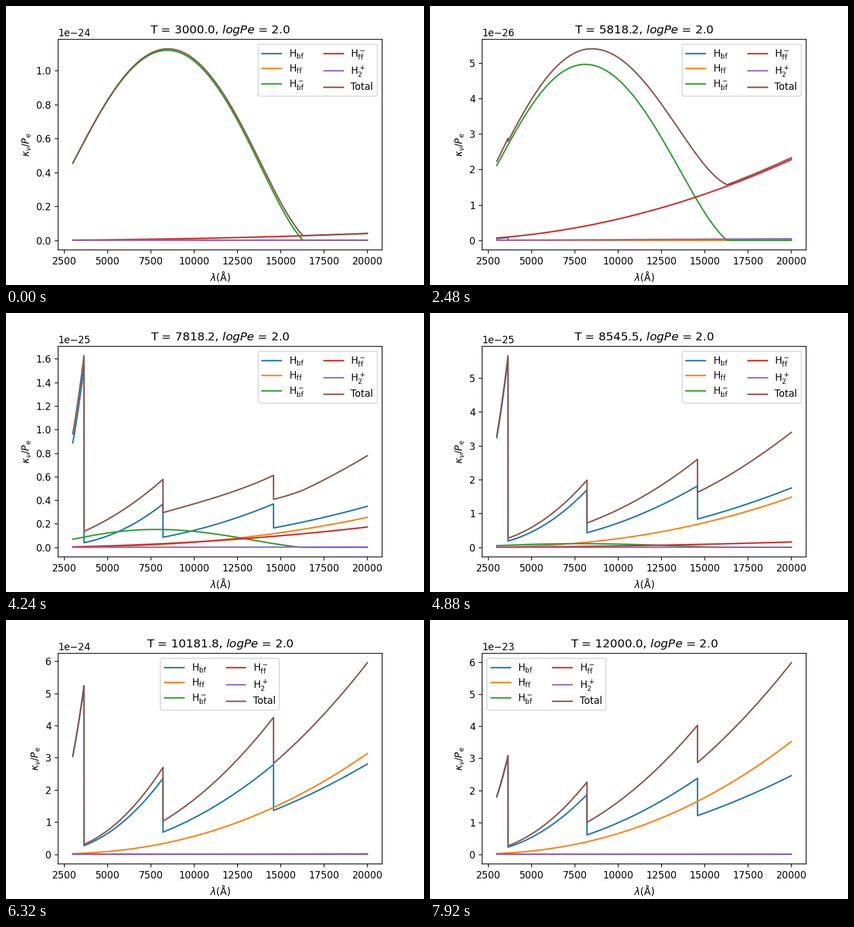
A matplotlib script that plays this animation: 734x489 px, repeating every 8000 ms.

```python
import numpy as np
import matplotlib.pyplot as plt
from matplotlib.animation import FuncAnimation

WIDTH, HEIGHT, DPI = 734, 489, 122.25
FRAMES, INTERVAL = 100, 80

RYDBERG = 1.0968e-3    # 1/angstrom
ION = 13.6             # hydrogen ionisation energy, eV
ALPHA = 1.0449e-26
LOG_E = np.log10(np.e)
PE = 100.0

lam = np.arange(3000.0, 20001.0, 2.0)
log_lam = np.log10(lam)
photon = 1.2398e4 / lam
x = lam * RYDBERG
gaunt = 0.3456 / np.cbrt(x)

# Bound levels: each absorbs only below its own ionisation edge.
level = np.arange(1.0, 121.0)
chi = ION * (1 - 1 / level**2)
ratio = x[:, None] / level**2
bf_weight = np.where(ratio < 1, 1 - gaunt[:, None] * (ratio - 0.5), 0) / level**3


def poly(coeffs, value):
    return np.polynomial.polynomial.polyval(value, coeffs)


cross_section = poly([1.99654, -1.18267e-5, 2.64243e-6, -4.40524e-10,
                      3.23992e-14, -1.39568e-18, 2.78701e-23], lam)
cross_section = np.where(lam < 16300, np.maximum(cross_section, 0), 0) * 1e-18

F0 = poly([-2.2763, -1.6850, 0.76661, -0.053346], log_lam)
F1 = poly([15.2827, -9.2846, 1.99381, -0.142631], log_lam)
F2 = poly([-197.789, 190.266, -67.9775, 10.6913, -0.625151], log_lam)


def opacities(temp):
    """Absorption per electron pressure for each source, then the total."""
    theta = 5040 / temp
    log_theta = np.log10(theta)
    stim = 1 - 10 ** (-photon * theta)
    scale = ALPHA * lam**3 * stim / PE

    h_bf = scale * (bf_weight @ 10 ** (-theta * chi))
    g_ff = 1 + gaunt * (LOG_E / (theta * photon) + 0.5)
    h_ff = scale * g_ff * LOG_E / (2 * theta * ION) * 10 ** (-theta * ION)
    neg_bf = 4.158e-10 * cross_section * theta**2.5 * 10 ** (0.754 * theta) * stim
    neg_ff = 1e-26 * 10 ** (F0 + F1 * log_theta + F2 * log_theta**2)
    # Simple power law for the small molecular ion term.
    h2 = 3.5e-28 * (lam / 2e4) ** 1.3 * (6900 / temp) ** 1.5

    parts = [h_bf, h_ff, neg_bf, neg_ff, h2]
    return parts + [sum(parts)]


plt.rcParams.update({"font.family": "DejaVu Sans", "font.size": 10})
fig, ax = plt.subplots(figsize=(WIDTH / DPI, HEIGHT / DPI), dpi=DPI)
fig.subplots_adjust(left=0.1246, right=0.8996, bottom=0.1258, top=0.8808)

labels = [r"H$_{\rm bf}$", r"H$_{\rm ff}$", r"H$_{\rm bf}^-$",
          r"H$_{\rm ff}^-$", r"H$_2^+$", "Total"]
lines = [ax.plot(lam, np.zeros_like(lam), label=name)[0] for name in labels]
ax.set_xlim(2150, 20850)
ax.set_xlabel(r"$\lambda(\mathrm{Å})$", labelpad=2.5)
ax.set_ylabel(r"$\kappa_\nu/P_{\rm e}$")
ax.legend(ncol=2, loc="best", labelspacing=0.4)

temps = np.linspace(3000, 12000, FRAMES)


def draw(frame):
    curves = opacities(temps[frame])
    for line, curve in zip(lines, curves):
        line.set_ydata(curve)
    top = curves[-1].max()
    ax.set_ylim(-0.05 * top, 1.05 * top)
    ax.set_title(f"T = {temps[frame]:.1f}, $logPe$ = 2.0")
    return lines


anim = FuncAnimation(fig, draw, frames=FRAMES, interval=INTERVAL,
                     init_func=lambda: draw(0), repeat=True, repeat_delay=0)
plt.show()
```
